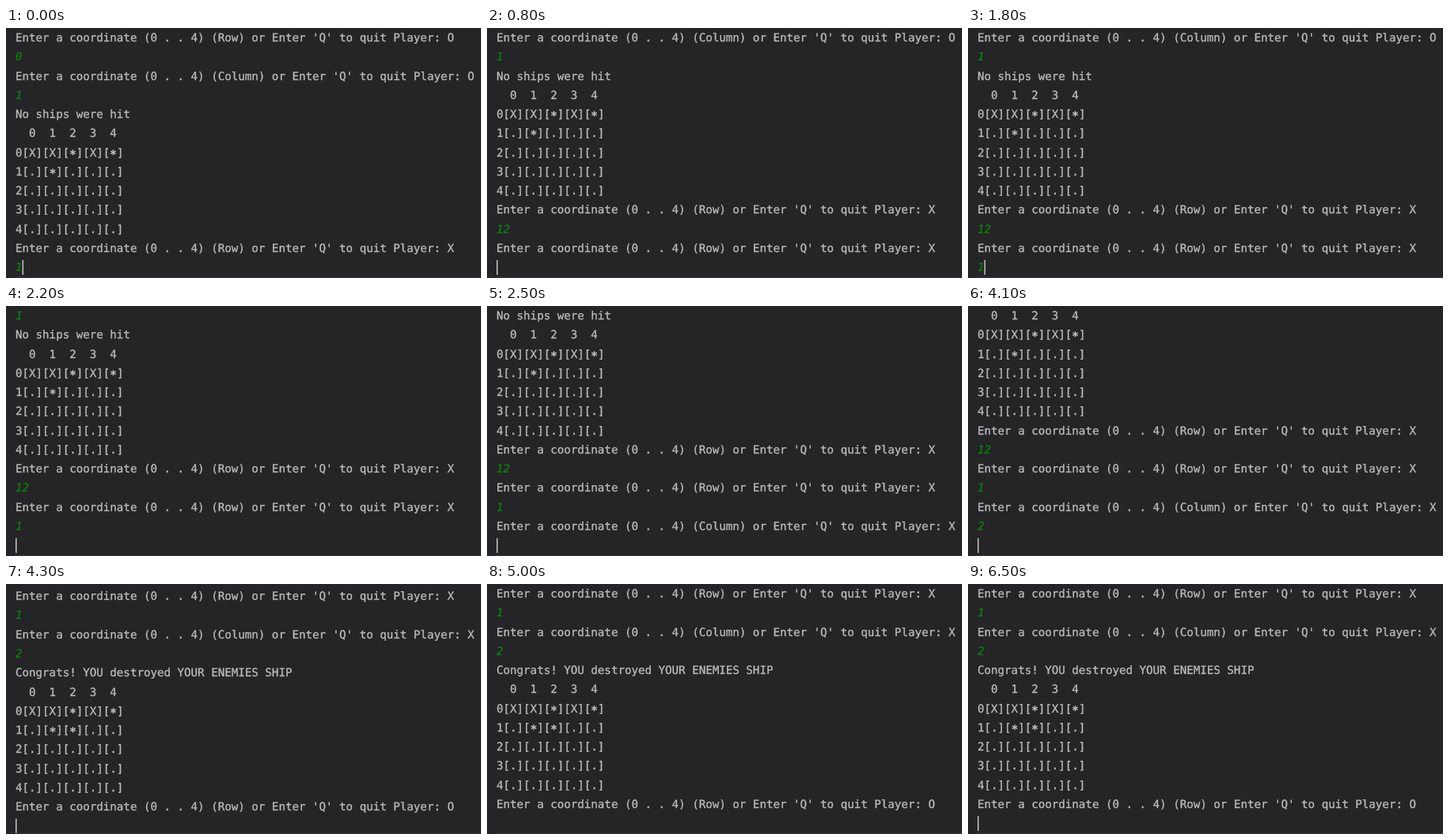
These frames come from a looping animation (600 by 317 pixels, 7 s). An HTML page:

```html
<!DOCTYPE html>
<html lang="en">
<head>
<meta charset="utf-8">
<title>Battleship console</title>
<style>
  html, body { margin: 0; width: 100%; height: 100%; overflow: hidden; background: #252427; }
  svg { display: block; width: 600px; height: 317px; }
  text {
    font: 14.16px "DejaVu Sans Mono", "Noto Sans Mono", monospace;
    color: #bcbcbc;
    fill: currentColor;
    stroke: currentColor;
    stroke-width: .3px;
    white-space: pre;
    text-rendering: geometricPrecision;
  }
  .input { color: #0b800b; font-style: italic; }
  .star { font-weight: bold; }
</style>
</head>
<body>
<svg viewBox="0 0 600 317">
  <g id="screen">
    <rect id="caret" y="294.3" width="1.6" height="18.7" fill="#bcbcbc"/>
  </g>
  <rect x="11" y="315.6" width="589" height="1" fill="#39393b"/>
</svg>
<script>
const LOOP = 7000;
const ROWS = 13, LEFT = 12, BASE = 17, PITCH = 24.27, CHAR = 8.52;
const HOLD = 700, BLINK = 500;          // caret stays lit after output, then blinks
const SETTLE = 100, OVERSHOOT = 3.2;    // long output lands a little low at first
const STAR_DROP = 2;

const ask = (axis, player) =>
  `Enter a coordinate (0 . . 4) (${axis}) or Enter 'Q' to quit Player: ${player}\n`;

const board = (...hits) => {
  const cols = [0, 1, 2, 3, 4];
  const row = r => r + [...(hits[r] || '.....')].map(c => `[${c}]`).join('');
  return `  ${cols.join('  ')}\n${cols.map(row).join('\n')}\n`;
};

// Text appended to the console, by time.
const output = [
  [-300, ask('Row', 'O') + '0\n' + ask('Column', 'O') + '1\n' +
         'No ships were hit\n' + board('XX*X*', '.*...') + ask('Row', 'X') + '1'],
  [700, '2'],
  [800, '\n' + ask('Row', 'X')],
  [1800, '1'],
  [2200, '\n'],
  [2300, ask('Column', 'X')],
  [3200, '2'],
  [4100, '\n'],
  [4300, 'Congrats! YOU destroyed YOUR ENEMIES SHIP\n' +
         board('XX*X*', '.**..') + ask('Row', 'O')]
];

const screen = document.getElementById('screen');
const caret = document.getElementById('caret');

function add(parent, tag, attrs, content = '') {
  const el = document.createElementNS('http://www.w3.org/2000/svg', tag);
  for (const key in attrs) el.setAttribute(key, attrs[key]);
  el.textContent = content;
  return parent.appendChild(el);
}

const rows = Array.from({ length: ROWS }, (_, i) =>
  add(screen, 'text', { x: LEFT, y: BASE + i * PITCH }));

// Asterisks sit lower than the font draws them.
function write(el, str) {
  el.textContent = '';
  el.setAttribute('class', /^\d+$/.test(str) ? 'input' : '');
  let low = 0;
  for (const part of str.match(/\*|[^*]+/g) || []) {
    const star = part === '*';
    const drop = star ? STAR_DROP : 0;
    add(el, 'tspan', { dy: drop - low, class: star ? 'star' : '' }, part);
    low = drop;
  }
}

let shown = 0;

function render(t) {
  const past = output.filter(([at]) => at <= t);
  const [since, latest] = past.at(-1);
  const age = t - since;
  const lines = past.map(([, text]) => text).join('').split('\n').slice(-ROWS);

  if (past.length !== shown) {
    shown = past.length;
    rows.forEach((el, i) => write(el, lines[i]));
    caret.setAttribute('x', LEFT + lines.at(-1).length * CHAR);
  }

  const long = latest.split('\n').length > ROWS / 2;
  const shift = long && age < SETTLE ? OVERSHOOT : 0;
  screen.setAttribute('transform', `translate(0 ${shift})`);

  const lit = age < HOLD || Math.floor((age - HOLD) / BLINK) % 2 === 1;
  caret.setAttribute('visibility', lit ? 'visible' : 'hidden');
}

const start = performance.now();

function tick() {
  render((performance.now() - start) % LOOP);
  requestAnimationFrame(tick);
}
tick();
</script>
</body>
</html>
```
